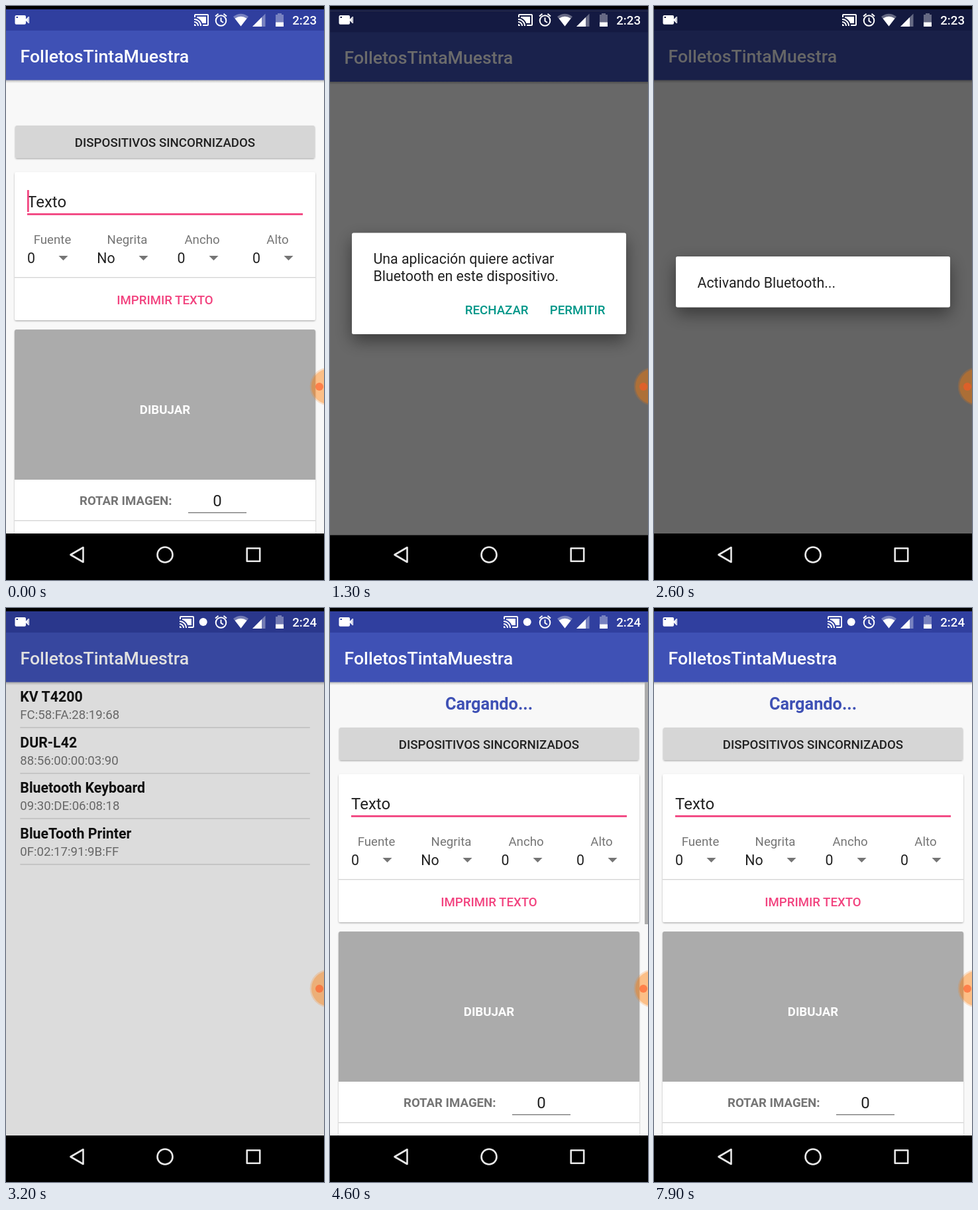
Animation of 480x864 px, one loop 8000 ms. Source, as an HTML page:

```html
<!DOCTYPE html>
<html lang="es">
<head>
<meta charset="utf-8">
<title>FolletosTintaMuestra</title>
<style>
  html, body { margin: 0; width: 100%; height: 100%; overflow: hidden; background: #000; }
  svg { display: block; width: 100%; height: 100%; font-family: Roboto, sans-serif; fill: #212121; }
  .title { font-size: 26.67px; font-weight: 500; fill: #fff; }
  .btn { font-size: 18.67px; font-weight: 500; }
  .small { font-size: 18.67px; fill: #757575; }
  .body { font-size: 21.33px; }
  .input { font-size: 24px; }
  .bold { font-weight: 700; }
  .mid { text-anchor: middle; }
  .end { text-anchor: end; }
  .pink { fill: #f2437f; }
  .teal { fill: #009688; }
  .line { fill: #d3d3d3; }
</style>
</head>
<body>
<svg viewBox="0 0 480 864">
  <defs>
    <filter id="lift" x="-5%" y="-10%" width="110%" height="125%">
      <feDropShadow dx="0" dy="1.2" stdDeviation="1.2" flood-opacity=".32"/>
    </filter>
    <filter id="float" x="-20%" y="-60%" width="140%" height="240%">
      <feDropShadow dx="0" dy="10" stdDeviation="13" flood-opacity=".44"/>
    </filter>
    <linearGradient id="fall" x2="0" y2="1">
      <stop offset="0" stop-opacity=".28"/>
      <stop offset="1" stop-opacity="0"/>
    </linearGradient>
    <clipPath id="btnClip"><rect x="14" y="180" width="452" height="49" rx="2.7"/></clipPath>
    <clipPath id="page"><rect y="5" width="480" height="789"/></clipPath>
    <g id="bars">
      <rect y="111" width="480" height="5" fill="url(#fall)"/>
      <rect y="5" width="480" height="33" fill="#303f9f"/>
      <rect y="37" width="480" height="74.5" fill="#3f51b5"/>
      <text class="title" x="21.5" y="84.8">FolletosTintaMuestra</text>
    </g>
  </defs>

  <rect width="480" height="864" fill="#000"/>

  <g id="main" clip-path="url(#page)">
    <rect y="5" width="480" height="789" fill="#f8f8f8"/>
    <use href="#bars"/>
    <text id="loading" class="mid bold" x="240" y="152.5" font-size="25.33" fill="#3f51b5">Cargando...</text>
    <rect id="scrollbar" x="475" y="112" width="5" height="364" fill="#acacac"/>

    <rect x="14" y="180" width="452" height="49" rx="2.7" fill="#d6d6d6" filter="url(#lift)"/>
    <g clip-path="url(#btnClip)"><circle id="ripple" cx="240" cy="205" fill="#000"/></g>
    <text class="btn mid" x="240" y="212.3">DISPOSITIVOS SINCORNIZADOS</text>

    <rect x="13" y="250" width="454" height="223" rx="2.7" fill="#fff" filter="url(#lift)"/>
    <text class="input" x="32" y="303">Texto</text>
    <rect class="pink" x="32" y="312" width="416" height="2.8"/>
    <rect class="pink" id="cursor" x="32" y="277" width="2.7" height="33"/>
    <g id="fields"></g>
    <rect class="line" x="13" y="408" width="454" height="1.3"/>
    <text class="btn mid pink" x="240" y="449">IMPRIMIR TEXTO</text>

    <rect x="13" y="487" width="454" height="330" rx="2.7" fill="#fff" filter="url(#lift)"/>
    <path d="M13 713V489.7Q13 487 15.7 487H464.3Q467 487 467 489.7V713Z" fill="#ababab"/>
    <text class="btn mid bold" x="240" y="614" style="fill:#fff">DIBUJAR</text>
    <text class="btn bold" x="111" y="751" style="fill:#757575">ROTAR IMAGEN:</text>
    <text class="input mid" x="319" y="753">0</text>
    <rect x="275" y="762" width="88" height="1.3" fill="#757575"/>
    <rect class="line" x="13" y="774" width="454" height="1.3"/>
  </g>

  <g id="list">
    <rect y="5" width="480" height="789" fill="#fafafa"/>
    <use href="#bars"/>
    <g id="rows"></g>
  </g>

  <rect id="dim" width="480" height="864" fill="#000"/>

  <g id="ask">
    <rect x="33" y="339" width="414" height="152.5" rx="2.7" fill="#fff" filter="url(#float)"/>
    <text class="body" x="65.5" y="386">Una aplicación quiere activar</text>
    <text class="body" x="65.5" y="411.5">Bluetooth en este dispositivo.</text>
    <rect id="press" x="319" y="436" width="107" height="38" rx="2.7" fill="#000"/>
    <text class="btn teal end" x="299.5" y="462">RECHAZAR</text>
    <text class="btn teal end" x="415.5" y="462">PERMITIR</text>
  </g>
  <g id="busy">
    <rect x="33" y="377" width="414" height="76.5" rx="2.7" fill="#fff" filter="url(#float)"/>
    <text class="body" x="65.5" y="423.5">Activando Bluetooth...</text>
  </g>

  <g fill="#ff7a00">
    <circle cx="487.5" cy="572.7" r="28.8" opacity=".2"/>
    <circle cx="487.5" cy="572.7" r="26.5" opacity=".32"/>
    <circle cx="473" cy="573" r="6" fill="#ff5722" opacity=".6"/>
  </g>

  <rect width="480" height="5" fill="#000"/>
  <g style="fill:#fff">
    <path fill-rule="evenodd" d="M15.5 14H28Q30 14 30 16V25.700Q30 27.700 28 27.700H15.500Q13.500 27.700 13.500 25.700V16Q13.500 14 15.500 14ZM15.500 16V18H18V16Z"/>
    <path d="M30 20L33 16.5V25.5L30 22ZM33.5 16H35V26H33.500Z"/>
    <path id="cast" d="M21 3H3c-1.100 0-2 .9-2 2v3h2V5h18v14h-7v2h7c1.100 0 2-.9 2-2V5c0-1.100-.9-2-2-2zM1 18v3h3c0-1.660-1.340-3-3-3zm0-4v2c2.760 0 5 2.240 5 5h2c0-3.870-3.130-7-7-7zm0-4v2c4.970 0 9 4.030 9 9h2c0-6.080-4.930-11-11-11zM19 7H5v1.630c3.960 1.280 7.090 4.410 8.370 8.370H19z"/>
    <circle id="radio" cx="297.7" cy="21" r="6"/>
    <g fill="none" stroke="#fff" stroke-width="2">
      <circle cx="324.5" cy="22" r="7.8"/>
      <path d="M324.5 17.5V22.5L328 25M316 15.5L320.5 11.8M333 15.5L328.5 11.8"/>
    </g>
    <path d="M343 16Q354.5 7.5 366 16L354.5 30.5Z" opacity=".35"/>
    <path d="M345.5 18.8Q354.5 12.5 363.5 18.8L354.5 30.5Z"/>
    <path d="M391.5 11.5V31H372Z" opacity=".35"/>
    <path d="M386 17V31H372Z"/>
    <path d="M410 11H416V13H419V31H407V13H410Z" opacity=".35"/>
    <rect x="407" y="24.5" width="12" height="6.5"/>
    <text id="clock" class="btn end" x="469" y="28" style="fill:#fff"></text>
  </g>
  <g fill="none" stroke="#e8e8e8" stroke-width="2.6" stroke-linejoin="round">
    <path d="M97.500 826L116.500 815V837Z"/>
    <circle cx="240" cy="826" r="11.5"/>
    <rect x="363.700" y="816.300" width="19.500" height="19.500"/>
  </g>
</svg>
<script>
const LOOP = 8000;
const el = id => document.getElementById(id);
const clamp = v => Math.max(0, Math.min(1, v));
const ramp = (t, from, to) => clamp((t - from) / (to - from));
const within = (t, from, to) => t >= from && t < to;
const set = (id, attrs) => {
  for (const key in attrs) el(id).setAttribute(key, attrs[key]);
};
const fade = (id, opacity) => set(id, { opacity, visibility: opacity > 0 ? 'visible' : 'hidden' });

const fields = [
  ['Fuente', '0', 70, 32, 86.5],
  ['Negrita', 'No', 183, 137.2, 207.5],
  ['Ancho', '0', 296, 258.5, 313.5],
  ['Alto', '0', 410, 372, 426.5]
];
el('fields').innerHTML = fields.map(([label, value, mid, left, arrow]) => `
  <text class="small mid" x="${mid}" y="357.5">${label}</text>
  <text class="body" x="${left}" y="387.3">${value}</text>
  <path d="M${arrow - 7} 376h14l-7 7z" fill="#757575"/>`).join('');

const devices = [
  ['KV T4200', 'FC:58:FA:28:19:68'],
  ['DUR-L42', '88:56:00:00:03:90'],
  ['Bluetooth Keyboard', '09:30:DE:06:08:18'],
  ['BlueTooth Printer', '0F:02:17:91:9B:FF']
];
el('rows').innerHTML = devices.map(([name, address], i) => `
  <g transform="translate(0 ${Math.round(i * 68.67)})">
    <text class="body bold" x="21.3" y="141" style="fill:#111">${name}</text>
    <text class="small" x="21.3" y="167">${address}</text>
    <rect class="line" x="21.3" y="179.3" width="437.5" height="1.3"/>
  </g>`).join('');

function draw(time) {
  const t = Math.floor(time / 100) * 100;

  const opening = ramp(t, 1050, 1400);
  const shift = t < 4400 ? 76 * (1 - opening) ** 2.73 : 26 * ramp(t, 4400, 4600);
  const move = `translate(0 ${shift})`;
  const shown = ramp(t, 1000, 1200);
  const blue = t >= 2900;

  fade('list', shown * (1 - ramp(t, 4400, 4600)));
  set('list', { transform: move });
  fade('rows', t >= 3000 ? 1 : 0);

  const dimIn = t < 1100 ? 0 : 1 - (1 - opening) ** 2.73;
  fade('dim', 0.6 * dimIn * (1 - ramp(t, 2800, 3300)));
  fade('ask', shown * (1 - ramp(t, 2200, 2500)));
  set('ask', { transform: move });
  fade('press', 0.12 * ramp(t, 1900, 2200));
  fade('busy', ramp(t, 2200, 2500) * (1 - ramp(t, 2800, 3100)));

  set('ripple', { r: 240 * ramp(t, 0, 400) });
  fade('ripple', within(t, 100, 600) ? 0.1 : 0);
  fade('loading', t >= 4500 ? 1 : 0);
  fade('scrollbar', t >= 4500 ? 1 - ramp(t, 5800, 6100) : 0);
  const blink = within(t, 5300, 5800) || within(t, 6300, 6800) || within(t, 7400, 7900);
  fade('cursor', t < 300 || blink ? 1 : 0);

  set('cast', { transform: `translate(${blue ? 261 : 283} 9)` });
  fade('radio', blue ? 1 : 0);
  el('clock').textContent = t >= 3000 ? '2:24' : '2:23';
}

const start = performance.now();
function tick() {
  draw((performance.now() - start) % LOOP);
  requestAnimationFrame(tick);
}
tick();
</script>
</body>
</html>
```
